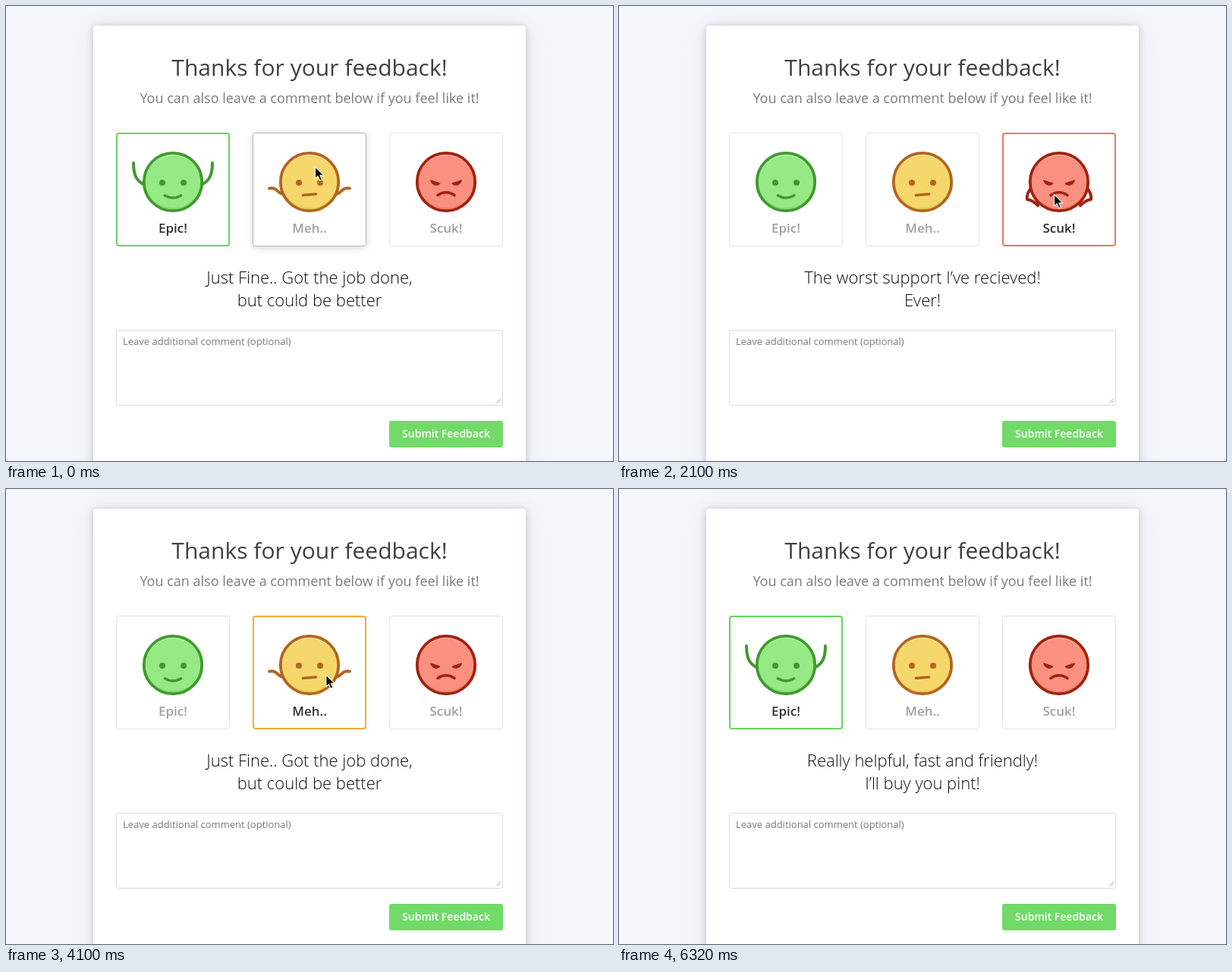
An HTML page for the animation above (6340 ms loop, 800 by 600 pixels).

```html
<!DOCTYPE html>
<html lang="en">
<head>
<meta charset="utf-8">
<title>Feedback</title>
<style>
  html, body { margin: 0; width: 100%; height: 100%; overflow: hidden; background: #f4f7fb; }
  svg { display: block; font-family: "Open Sans", sans-serif; }
  .panel { filter: drop-shadow(0 1px 4px rgba(50, 60, 80, .28)) drop-shadow(0 2px 18px rgba(50, 60, 80, .08)); }
  .lift { filter: drop-shadow(0 2px 4px rgba(0, 0, 0, .16)); }
  .line { fill: none; stroke-linecap: round; stroke-linejoin: round; }
</style>
</head>
<body>
<svg width="800" height="600" viewBox="0 0 800 600">
  <defs><clipPath id="disc"><circle r="38"/></clipPath></defs>
  <rect class="panel" x="115" y="26" width="570" height="640" rx="4" fill="#fff"/>
  <g text-anchor="middle">
    <text x="400" y="92" font-size="30" fill="#404040">Thanks for your feedback!</text>
    <text x="400" y="128" font-size="18" fill="#7b7b7b">You can also leave a comment below if you feel like it!</text>
    <g id="cards"></g>
    <g font-size="22" font-weight="300" fill="#0c0c0c">
      <text id="line0" x="400" y="365.5"></text>
      <text id="line1" x="400" y="395.5"></text>
    </g>
    <rect x="505" y="547" width="150" height="35" rx="3" fill="#71da68"/>
    <text x="580" y="569" font-size="14" font-weight="600" fill="#fff">Submit Feedback</text>
  </g>
  <rect x="145.5" y="427.5" width="509" height="99" rx="2.5" fill="#fff" stroke="#dcdcdc"/>
  <text x="154" y="447" font-size="13" fill="#787878">Leave additional comment (optional)</text>
  <path d="M646 523.5L652 517.5M649 523.5L652 520.5" stroke="#aaa" fill="none"/>
  <path id="cursor" d="M0 0V15.5L3.6 12.2L6.2 18.2L9 17L6.4 11.2H11.3Z" fill="#000" stroke="#fff" stroke-width="1.1"/>
</svg>
<script>
const LOOP = 6340, FADE = 240, ARM = 200, PAST = -999, NEVER = 9999;
const $ = id => document.getElementById(id);

// on / hover: time spans in which a card is selected or under the pointer
const cards = [
  { x: 220, label: 'Epic!', tint: [98, 214, 92], ink: '#41992f', fill: '#96ea85', hi: '#b9f5ab', low: '#86dc74',
    lines: ['Really helpful, fast and friendly!', 'I’ll buy you pint!'],
    arm: 'M-52 -25C-52 -9 -48 -1 -37 4', eye: 'M-18 1a4 4 0 1 0 8 0a4 4 0 1 0 -8 0Z', mouth: 'M-10.5 18Q0 24 10.5 18',
    on: [[PAST, 160], [4540, NEVER]], hover: [[4299, 5287]] },
  { x: 400, label: 'Meh..', tint: [243, 170, 60], ink: '#b1661f', fill: '#f6d76c', hi: '#fae79f', low: '#eac95a',
    lines: ['Just Fine.. Got the job done,', 'but could be better'],
    arm: 'M-53 8.5C-42 6.5 -43 15 -35 16', eye: 'M-18 1a4 4 0 1 0 8 0a4 4 0 1 0 -8 0Z', mouth: 'M-8.5 17.5L8.5 16',
    on: [[160, 1680], [3330, 4540]], hover: [[PAST, 410], [2750, 4259]] },
  { x: 580, label: 'Scuk!', tint: [236, 120, 100], ink: '#a1220f', fill: '#fa9180', hi: '#fdb4a7', low: '#ee806f',
    lines: ['The worst support I’ve recieved!', 'Ever!'],
    arm: 'M-36 7C-41 13 -43 18 -42 23Q-35 24 -28 31', eye: 'M-21 -3L-7.5 1.5C-9 5.5 -14 5.5 -17 3.5Q-20.5 1 -21 -3Z', mouth: 'M-11 17.5Q0 10 11 17.5',
    on: [[1680, 3330]], hover: [[480, 2699]] }
];

// pointer stops: time, x, y
const path = [
  [0, 407.5, 212], [240, 407.5, 212], [580, 550.5, 254.5], [840, 573.5, 248.5], [2560, 573.5, 248.5],
  [2800, 462, 247], [3040, 440.5, 245], [4020, 440.5, 245], [4440, 249, 246.5], [5140, 249, 246.5], [5560, 300, -30]
];

const both = shape => shape + `<g transform="scale(-1 1)">${shape}</g>`;

for (const c of cards) {
  const g = document.createElementNS('http://www.w3.org/2000/svg', 'g');
  g.setAttribute('transform', `translate(${c.x} 232)`);
  g.innerHTML = `
    <rect class="lift" x="-75" y="-65" width="150" height="150" rx="4" fill="#fff"/>
    <rect class="edge" fill="#fff"/>
    <g class="arms line" stroke="${c.ink}" stroke-width="4">${both(`<path d="${c.arm}"/>`)}</g>
    <g clip-path="url(#disc)">
      <circle r="38" fill="${c.hi}"/>
      <circle r="37.5" cy="3" fill="${c.low}"/>
      <ellipse rx="37.5" ry="34" fill="${c.fill}"/>
    </g>
    <circle r="38.2" fill="none" stroke="${c.ink}" stroke-width="3.8"/>
    <g fill="${c.ink}">${both(`<path d="${c.eye}"/>`)}</g>
    <path class="line" d="${c.mouth}" stroke="${c.ink}" stroke-width="3.6"/>
    <text y="67" font-size="17" font-weight="600">${c.label}</text>`;
  $('cards').append(g);
  c.parts = Object.fromEntries(['.lift', '.edge', '.arms', 'text'].map(s => [s.replace('.', ''), g.querySelector(s)]));
}

const smooth = p => (p = Math.min(1, Math.max(0, p)), p * p * (3 - 2 * p));
const mix = (a, b, p) => a + (b - a) * p;
const within = (t, spans) => spans.some(([a, b]) => t >= a && t < b);
const level = (t, spans, time) =>
  Math.max(...spans.map(([a, b]) => smooth((t - a) / time) * (1 - smooth((t - b) / time))));
const set = (el, attrs) => { for (const k in attrs) el.setAttribute(k, attrs[k]); };

function pointer(t) {
  const i = path.findIndex(p => p[0] > t);
  if (i < 0) return path[path.length - 1].slice(1);
  const a = path[i - 1], b = path[i], p = smooth((t - a[0]) / (b[0] - a[0]));
  return [mix(a[1], b[1], p), mix(a[2], b[2], p)];
}

function draw(t) {
  for (const c of cards) {
    const { lift, edge, arms, text } = c.parts;
    const on = level(t, c.on, FADE), hover = level(t, c.hover, FADE);
    const reach = Math.max(level(t, c.on, ARM), level(t, c.hover, ARM));
    const width = 1 + on, gray = mix(226, 180, hover), ink = mix(160, 48, on);
    set(lift, { opacity: hover * (1 - on) });
    set(edge, {
      x: -75 + width / 2, y: -65 + width / 2, width: 150 - width, height: 150 - width, rx: 4 - width / 2,
      'stroke-width': width, stroke: `rgb(${c.tint.map(v => mix(gray, v, on))})`
    });
    set(arms, { transform: `scale(${mix(.5, 1, reach)})` });
    set(text, { fill: `rgb(${ink},${ink},${ink})` });
  }
  const shown = cards.find(c => within(t, c.hover)) || cards.find(c => within(t, c.on));
  shown.lines.forEach((s, i) => { $('line' + i).textContent = s; });
  set($('cursor'), { transform: `translate(${pointer(t)})` });
}

const start = performance.now();
function tick() {
  draw((performance.now() - start) % LOOP);
  requestAnimationFrame(tick);
}
tick();
</script>
</body>
</html>
```
